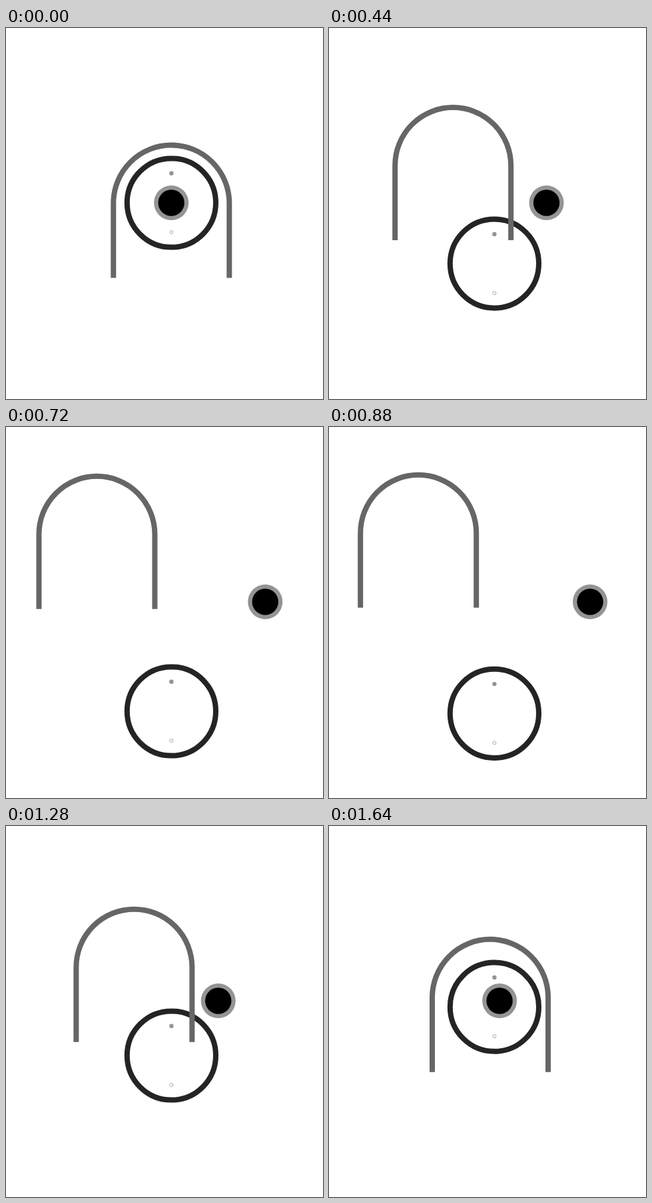
An HTML page for the animation above (1.68 s loop, 476 px wide and 556 px high).

```html
<!DOCTYPE html>
<html>
<head>
<meta charset="utf-8">
<style>
html, body { margin: 0; width: 100%; height: 100%; overflow: hidden; background: #fff; }
svg { display: block; }
</style>
</head>
<body>
<svg width="476" height="556" viewBox="0 0 476 556" fill="none">
  <g id="core">
    <circle cx="248.2" cy="262" r="26" fill="#949494"/>
    <circle cx="248.2" cy="262" r="19.7" fill="#000"/>
  </g>
  <g id="ring">
    <circle cx="248.4" cy="262" r="66.6" stroke="#242424" stroke-width="8"/>
    <circle cx="248.4" cy="217.8" r="3.2" fill="#949494"/>
    <circle cx="248.4" cy="306" r="2.5" stroke="#aaa"/>
  </g>
  <path id="arch" d="M161.3 374.5V262.5a87 87 0 0 1 174 0V374.5" stroke="#666" stroke-width="8"/>
</svg>
<script>
const LOOP = 1680, STEP = 40;
// [time in ms, drop of the ring in px]
const keys = [
  [0, 0], [80, 0], [280, 53.2], [600, 129], [640, 145], [800, 183], [880, 167.3],
  [1080, 124.8], [1160, 107], [1200, 107], [1280, 82], [1320, 82], [1360, 66], [1640, 9.2], [1680, 0]
];
const [core, ring, arch] = ["core", "ring", "arch"].map(id => document.getElementById(id));

function dropAt(t) {
  const i = keys.findIndex(k => k[0] > t);
  const [t0, a] = keys[i - 1], [t1, b] = keys[i];
  return a + (b - a) * (t - t0) / (t1 - t0);
}

const move = (part, x, y) => part.setAttribute("transform", `translate(${x} ${y})`);

function draw() {
  const t = performance.now() % LOOP;
  const d = dropAt(Math.floor(t / STEP) * STEP);
  move(core, d * 0.86, 0);
  move(ring, 0, d);
  move(arch, d * -0.682, d * -0.62);
  requestAnimationFrame(draw);
}
draw();
</script>
</body>
</html>
```
